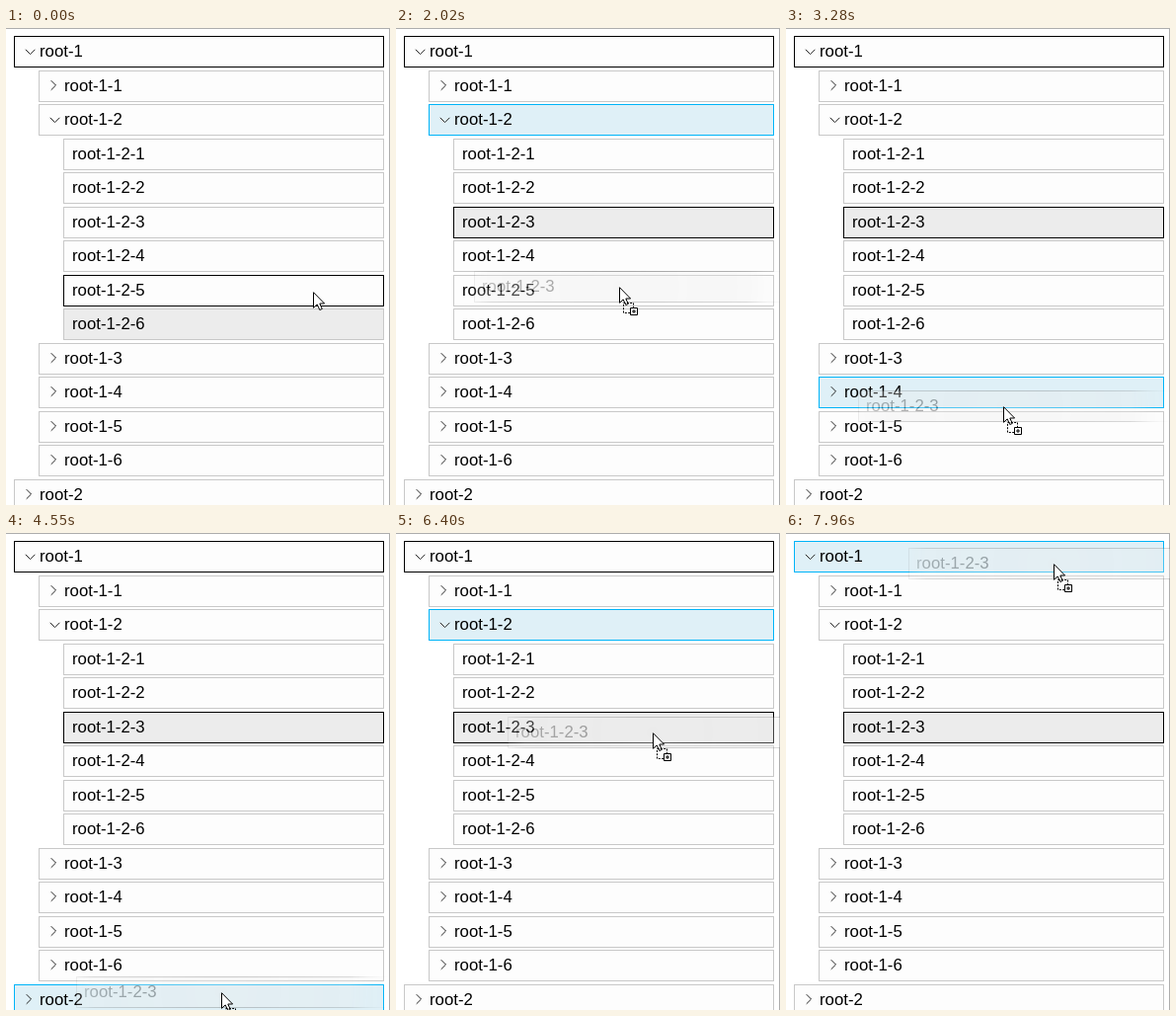
These frames come from a looping animation (389 px wide and 483 px high, 8 s). An HTML page:

```html
<!DOCTYPE html>
<html lang="en">
<head>
<meta charset="utf-8">
<title>Tree drag and drop</title>
<style>
html, body { margin: 0; width: 100%; height: 100%; overflow: hidden; background: #fff; }
#stage { position: relative; width: 389px; height: 483px; overflow: hidden;
  font: 16.8px/30px "Liberation Sans", Arial, sans-serif; color: #000; }
.edge { position: absolute; background: #adadad; }
.row { position: absolute; box-sizing: border-box; height: 32px; border: 1px solid #c8c8c8;
  background: #fdfdfd; white-space: pre; }
.row svg { position: absolute; left: -1px; top: -1px; fill: none; stroke: #222; }
.row.selected { background: #ececec; }
.row.hover { border-color: #000; }
.row.drop { background: #dff0f7; border-color: #00b4f8; }
#ghost { --fade: radial-gradient(circle at 147px 16px, rgba(0,0,0,.4), rgba(0,0,0,.28) 130px, rgba(0,0,0,.1) 150px, transparent 170px);
  left: 0; top: 0; width: 325px; padding-left: 7px; background: #ececec; border-color: #777;
  -webkit-mask-image: var(--fade); mask-image: var(--fade); }
#cursor { position: absolute; left: 0; top: 0; overflow: visible; }
</style>
</head>
<body>
<div id="stage">
  <div class="edge" style="left:0;top:0;width:389px;height:1px"></div>
  <div class="edge" style="left:388px;top:0;width:1px;height:483px"></div>
  <div id="tree"></div>
  <div id="ghost" class="row">root-1-2-3</div>
  <svg id="cursor" width="20" height="30" fill="#fff" stroke="#000">
    <path d="M.5 .7V16.3L4.2 12.9L6.8 18.5L9.3 17.4L6.8 12H11.6Z"/>
    <g id="badge">
      <path d="M4.5 16.5h10v10h-10z" fill="none" stroke-dasharray="2 1.33"/>
      <path d="M11.5 21.5h7v7h-7z"/>
      <path d="M13 25h4M15 23v4"/>
    </g>
  </svg>
</div>
<script>
const LOOP = 8000, TICK = 60, PITCH = 34.5, TOP = 8, PRESS = 680, DRAG = 790;
const ARROW = { open: 'M11.8 13.8l4.8 4.8l4.8-4.8', closed: 'M12.7 10.2l4.8 4.8l-4.8 4.8' };
const $ = id => document.getElementById(id);
const rows = [];

function addRow(name, depth, arrow) {
  const left = 8 + 25 * depth;
  const row = document.createElement('div');
  row.className = 'row';
  row.style.left = left + 'px';
  row.style.width = 383 - left + 'px';
  row.style.top = Math.round(TOP + PITCH * rows.length) + 'px';
  row.style.paddingLeft = arrow ? '25px' : '8px';
  if (arrow) row.innerHTML = `<svg width="24" height="30"><path d="${ARROW[arrow]}"/></svg>`;
  row.append(name);
  $('tree').append(row);
  row.drop = arrow ? row : rows.find(r => r.textContent === name.slice(0, -2)); // leaves drop into their parent
  return rows[rows.push(row) - 1];
}

addRow('root-1', 0, 'open');
for (let i = 1; i <= 6; i++) {
  addRow(`root-1-${i}`, 1, i === 2 ? 'open' : 'closed');
  for (let j = 1; i === 2 && j <= 6; j++) addRow(`root-1-2-${j}`, 2);
}
addRow('root-2', 0, 'closed');

const named = name => rows.find(r => r.textContent === name);
const dragged = named('root-1-2-3'), before = named('root-1-2-6');

// Pointer stops: aim at the row, drag down, rest, drag up
const stops = [
  { t: 60, x: 311, y: 267 }, { t: 470, x: 205, y: 197 }, { t: PRESS, x: 205, y: 197 },
  { t: 2020, x: 226, y: 262 }, { t: 3280, x: 220, y: 383 }, { t: 4120, x: 218, y: 465 },
  { t: 4550, x: 218, y: 465 }, { t: 5390, x: 238, y: 352 }, { t: 6400, x: 260, y: 202 },
  { t: 7960, x: 271, y: 31 }
];

// Speed through a stop; zero where the pointer rests
function speed(i, axis) {
  const a = stops[i - 1], b = stops[i], c = stops[i + 1];
  if (!a || !c || a.y === b.y || b.y === c.y) return 0;
  return (c[axis] - a[axis]) / (c.t - a.t);
}

// Smooth curve through the stops, advanced one screen tick at a time
function pointer(t) {
  const i = stops.findIndex(s => s.t > t);
  if (i === 0) return stops[0];
  if (i < 0) return stops[stops.length - 1];
  const a = stops[i - 1], b = stops[i], span = b.t - a.t;
  const ticks = Math.round(span / TICK);
  const u = Math.floor((t - a.t) / span * ticks + 0.01) / ticks;
  const ease = u * u * (3 - 2 * u);
  const along = axis => a[axis] + (b[axis] - a[axis]) * ease +
    span * u * (1 - u) * ((1 - u) * speed(i - 1, axis) - u * speed(i, axis));
  return { x: along('x'), y: along('y') };
}

const rowAt = y => rows[Math.max(0, Math.min(rows.length - 1, Math.floor((y - TOP + 2) / PITCH)))];
const place = (el, x, y) => { el.style.transform = `translate(${Math.round(x)}px,${Math.round(y)}px)`; };

function render(t) {
  const { x, y } = pointer(t);
  const pressed = t >= PRESS, dragging = t >= DRAG;
  const hover = pressed ? dragged : rowAt(y);
  const selected = pressed ? dragged : before;
  const drop = dragging ? rowAt(y).drop : null;

  for (const row of rows) {
    row.classList.toggle('hover', row === rows[0] || row === hover);
    row.classList.toggle('selected', row === selected);
    row.classList.toggle('drop', row === drop);
  }
  place($('cursor'), x, y);
  place($('ghost'), x - 147, y - 16);
  $('ghost').style.display = $('badge').style.display = dragging ? '' : 'none';
}

const begin = performance.now();
function frame() {
  render((performance.now() - begin) % LOOP);
  requestAnimationFrame(frame);
}
frame();
</script>
</body>
</html>
```
